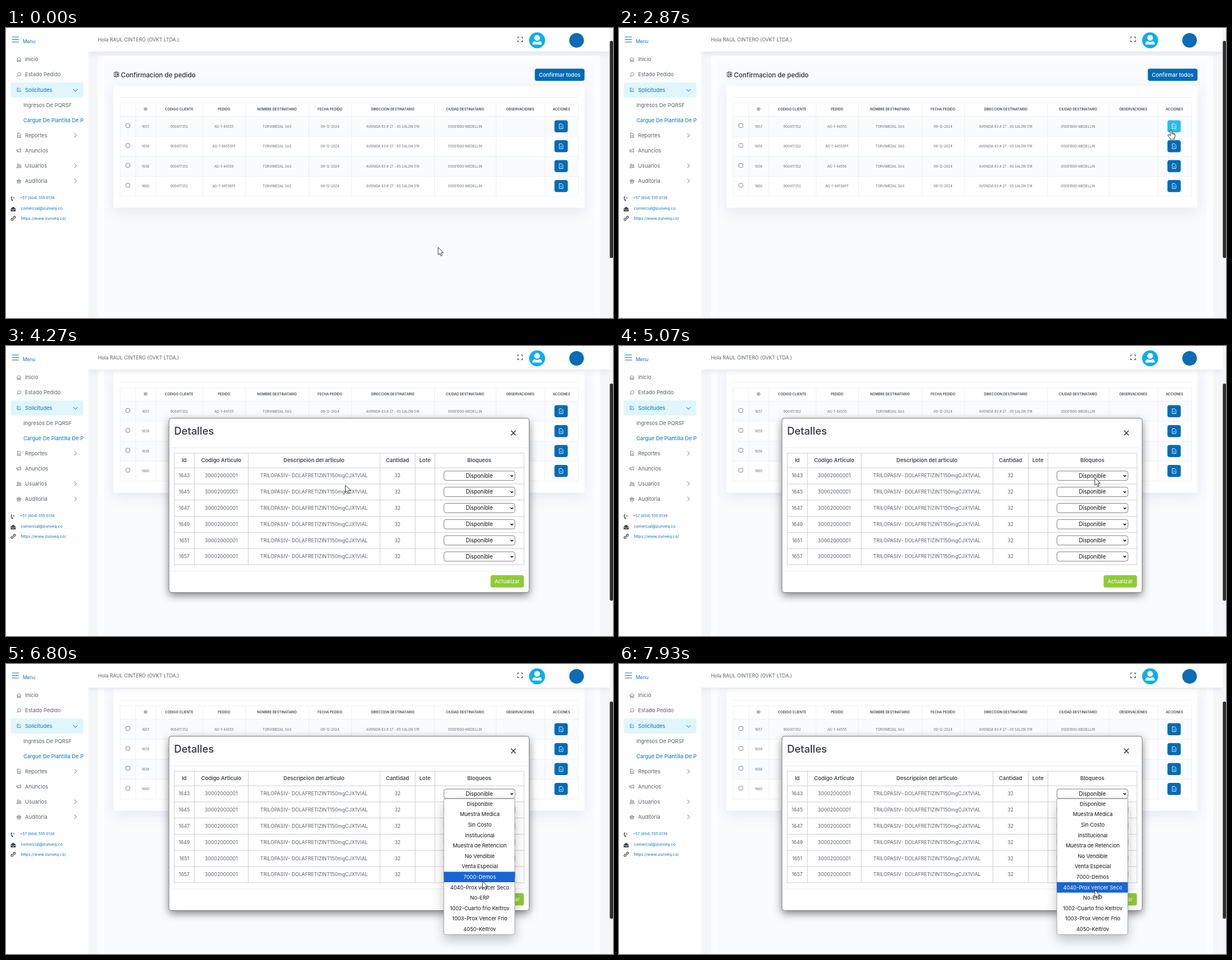
An HTML page with a canvas for the animation above (8 s loop, 1083x517 px).

```html
<!DOCTYPE html>
<html lang="es">
<head>
<meta charset="utf-8">
<title>Confirmacion de pedido</title>
<style>
  html, body { margin: 0; width: 100%; height: 100%; overflow: hidden; background: #fff; }
  canvas { display: block; width: 1083px; height: 517px; }
</style>
</head>
<body>
<canvas id="stage"></canvas>
<script>
const W = 1083, H = 517, LOOP = 8000, FPS = 15;
const SCROLL_AT = 3130, REFRESH_AT = 3990, OPEN_AT = 5390, SCROLL_BY = 59;
const BLUE = '#006bb6', LINK = '#0a70bd', GREY = '#5d6268', LINE = '#eceef1';

const canvas = document.getElementById('stage');
const ctx = canvas.getContext('2d');
const dpr = window.devicePixelRatio || 1;
canvas.width = W * dpr;
canvas.height = H * dpr;

// time, x, y of the pointer tip
const path = [
  [0, 771, 391], [530, 771, 391], [700, 759, 370], [1000, 840, 205], [1190, 895, 140],
  [1330, 928, 165], [1600, 984, 189], [1870, 986, 176], [2200, 984, 181], [2450, 998, 176],
  [2750, 983, 183], [3070, 990, 178], [3530, 990, 178], [3930, 885, 205], [4270, 605, 248],
  [4400, 598, 252], [4800, 825, 236], [5070, 849, 235], [5600, 849, 235], [5930, 853, 267],
  [6400, 846, 312], [6800, 850, 387], [7270, 904, 451], [7530, 880, 475], [7930, 849, 403],
  [8000, 849, 403]
];

const options = ['Disponible', 'Muestra Medica', 'Sin Costo', 'Institucional',
  'Muestra de Retencion', 'No Vendible', 'Venta Especial', '7000-Demos',
  '4040-Prox vencer Seco', 'No-ERP', '1002-Cuarto frio Keltrov',
  '1003-Prox Vencer Frio', '4050-Keltrov'];

const orders = [['1657', 'AG-1-44555'], ['1659', 'AG-1-44555FF'],
  ['1658', 'AG-1-44556'], ['1660', 'AG-1-44556FF']];
const orderCols = [203, 231, 267, 351, 427, 540, 616, 764, 874, 961, 1021];
const orderHeads = ['', 'ID', 'CODIGO CLIENTE', 'PEDIDO', 'NOMBRE DESTINATARIO', 'FECHA PEDIDO',
  'DIRECCION DESTINATARIO', 'CIUDAD DESTINATARIO', 'OBSERVACIONES', 'ACCIONES'];

const details = [
  { cols: [300, 337, 434, 664, 728, 764, 924], first: 1644, last: 1658, qty: '300', select: 780,
    name: 'ELIVORAN 75 - TRELOFAVINA 75mg X 30 CAP' },
  { cols: [300, 336, 432, 667, 730, 765, 924], first: 1643, last: 1657, qty: '32', select: 781,
    name: 'TRILOPASIV- DOLAFRETIZINT150mgCJX1VIAL' }
];
const detailHeads = ['Id', 'Codigo Articulo', 'Descripcion del articulo', 'Cantidad', 'Lote', 'Bloqueos'];

// y is the middle of the capitals
function text(str, x, y, size, color, align = 'left', weight = 400) {
  ctx.font = `${weight} ${size}px Inter, "Open Sans", sans-serif`;
  ctx.textAlign = align;
  ctx.fillStyle = color;
  ctx.fillText(str, x, y + size * 0.36);
}

function rect(x, y, w, h, color) {
  ctx.fillStyle = color;
  ctx.fillRect(x, y, w, h);
}

function box(x, y, w, h, r, fill, stroke, lw = 1) {
  ctx.beginPath();
  ctx.roundRect(x, y, w, h, r);
  if (fill) { ctx.fillStyle = fill; ctx.fill(); }
  if (stroke) { ctx.strokeStyle = stroke; ctx.lineWidth = lw; ctx.stroke(); }
}

function shadowed(color, blur, dy, draw) {
  ctx.save();
  ctx.shadowColor = color;
  ctx.shadowBlur = blur * dpr;
  ctx.shadowOffsetY = dy * dpr;
  draw();
  ctx.restore();
}

function shape(d, x, y, { stroke, fill, lw = 1 }) {
  const p = new Path2D(d);
  ctx.save();
  ctx.translate(x, y);
  if (fill) { ctx.fillStyle = fill; ctx.fill(p); }
  if (stroke) { ctx.strokeStyle = stroke; ctx.lineWidth = lw; ctx.stroke(p); }
  ctx.restore();
}

function disc(x, y, r, color) {
  ctx.beginPath();
  ctx.arc(x, y, r, 0, Math.PI * 2);
  ctx.fillStyle = color;
  ctx.fill();
}

// smooth curve through the keys without overshoot
function tangent(i, c) {
  const a = path[i - 1], b = path[i], d = path[i + 1];
  if (!a || !d) return 0;
  const s0 = (b[c] - a[c]) / (b[0] - a[0]), s1 = (d[c] - b[c]) / (d[0] - b[0]);
  return s0 * s1 <= 0 ? 0 : 2 * s0 * s1 / (s0 + s1);
}

function pointer(t) {
  let i = 0;
  while (i < path.length - 2 && path[i + 1][0] <= t) i++;
  const a = path[i], b = path[i + 1], dt = b[0] - a[0], u = (t - a[0]) / dt;
  return [1, 2].map(c => {
    const u2 = u * u, u3 = u2 * u;
    return (2 * u3 - 3 * u2 + 1) * a[c] + (u3 - 2 * u2 + u) * dt * tangent(i, c) +
      (3 * u2 - 2 * u3) * b[c] + (u3 - u2) * dt * tangent(i + 1, c);
  });
}

const icons = {
  home: 'M0 4L4 .5L8 4M1.2 3.3V8H3V5H5V8H6.8V3.3',
  search: 'M7.6 3.5a3 3 0 1 1-6 0a3 3 0 1 1 6 0M2.5 5.6L.3 7.8',
  edit: 'M4 1H1V7H7V4M3 5L7.2 .8M3 5L3.4 3.6',
  doc: 'M1.5 0H5L7 2V8H1.5ZM3 4H5.6M3 6H5.6',
  horn: 'M0 2.8H2.5L7.2 1V7L2.5 5.2H0ZM2 5.2V8',
  users: 'M4.3 2.5a1.6 1.6 0 1 1-3.2 0a1.6 1.6 0 1 1 3.2 0M0 7.5Q0 5 2.7 5T5.2 7.5ZM7.6 3.5a1.2 1.2 0 1 1-2.4 0a1.2 1.2 0 1 1 2.4 0M6 5.7Q8.3 5.5 8.3 7.5H6.5',
  audit: 'M0 4L4 .7L8 4ZM1.2 4V7.8H6.8V4M4 2.2V6.4M2.8 5.5H5.2'
};

const menu = [
  ['Inicio', 56, 'home'], ['Estado Pedido', 83, 'search'], ['Solicitudes', 110.3, 'edit', 'down'],
  ['Ingresos De PQRSF', 137.3], ['Cargue De Plantilla De P', 164.3],
  ['Reportes', 191.4, 'doc', 'right'], ['Anuncios', 218.4, 'horn'],
  ['Usuarios', 245.5, 'users', 'right'], ['Auditoria', 272.5, 'audit', 'right']
];

function sidebar() {
  rect(0, 0, 147, H, '#fff');
  shape('M0 0H12.5M0 4.5H12.5M0 9H12.5', 10.5, 16, { stroke: LINK, lw: 1.2 });
  text('Menu', 30, 24.3, 8.4, LINK);
  box(8.5, 97, 129.5, 27, 4, '#e0f6fa');
  ctx.save();
  ctx.beginPath();
  ctx.rect(0, 0, 138.5, H);
  ctx.clip();
  menu.forEach(([label, y, icon, arrow], i) => {
    const color = i === 2 || i === 4 ? LINK : GREY;
    text(label, icon ? 34 : 31, y, 9.4, color);
    if (icon) shape(icons[icon], 19, y - 4, { stroke: color, lw: 0.8 });
    if (arrow === 'down') shape('M-4 -1.8L0 2.2L4 -1.8', 124, y + 0.5, { stroke: color });
    if (arrow === 'right') shape('M-1.8 -3.6L1.8 0L-1.8 3.6', 124, y, { stroke: GREY });
  });
  ctx.restore();
  text('+57 (604) 555 0138', 25, 302.4, 6.6, LINK);
  text('comercial@zunveq.co', 26.5, 321.3, 7.1, LINK);
  text('https://www.zunveq.co/', 26.5, 339.8, 7.1, LINK);
  const dark = '#454a50';
  shape('M2.6 .3L.6 1Q-.6 5.5 3 8.6L4.6 7.4L3.4 5.6L2.4 6Q1.4 4.4 1.6 2.8L2.9 2.2Z', 8.3, 300, { fill: dark });
  shape('M4.6 1.3Q6.6 1.5 6.4 4M4.6 3Q5.2 3 5.2 4', 8.3, 300, { stroke: dark, lw: 0.8 });
  shape('M0 3.2L4.5 0L9 3.2V8.6H0Z', 8.3, 318.5, { fill: dark });
  shape('M0 4L4.5 6.6L9 4', 8.3, 318.5, { stroke: '#fff', lw: 0.7 });
  shape('M3 5.6L5.6 3M4 2.6L5.6 1Q7 0 8 1.1T7.9 3.3L6.2 5M5 6L3.3 7.7Q2 8.7.9 7.6T1 5.3L2.6 3.7', 8.5, 335, { stroke: dark, lw: 1.3 });
}

function header() {
  shadowed('rgba(70,80,100,.13)', 10, 2, () => rect(147, -20, 930, 62, '#fff'));
  text('Hola RAUL CINTERO (OVKT LTDA.)', 164, 21, 8.75, GREY);
  shape('M0 2.6V0H2.6M5.8 0H8.4V2.6M8.4 5.8V8.4H5.8M2.6 8.4H0V5.8', 913, 16, { stroke: '#444', lw: 1.1 });
  disc(947.6, 22, 14.3, '#0daeea');
  disc(947.6, 17.6, 5.1, '#fff');
  shape('M-8.4 7.4Q-8.4 2.2 -4.4 1.6Q0 4.4 4.4 1.6Q8.4 2.2 8.4 7.4Z', 947.6, 22, { fill: '#fff' });
  disc(1018, 22, 13, '#0a6cb5');
}

function actionButton(y, hot) {
  box(978.5, y - 10.8, 23.8, 21.6, 4, hot ? '#2bb9f1' : BLUE);
  shape('M0 0H4.4L6.6 2.2V8.6H0ZM2.4 4.3H3.4V6.8', 987.1, y - 4.3, { stroke: '#fff', lw: 0.9 });
}

function page(scrolled, hot) {
  rect(147, 0, 930, H, '#f4f6f8');
  ctx.save();
  ctx.translate(0, scrolled ? -SCROLL_BY : 0);
  rect(164, 49, 896, 600, '#fdfdfe');
  rect(175, 58, 874, 600, '#fafbfd');

  shape('M2.5 1H0V8.5H2.5M5 1H8V8.5H5M2.5 0V9.6L5 9.2V.4ZM5.6 3L7.4 6.4M7.4 3L5.6 6.4', 193, 78, { stroke: '#333', lw: 0.9 });
  text('Confirmacion de pedido', 205, 84, 11.6, '#2c2f33', 'left', 500);
  box(943.5, 72.5, 88.7, 21.7, 4, BLUE);
  text('Confirmar todos', 987.8, 83.3, 9.5, '#fff', 'center', 500);

  shadowed('rgba(70,85,110,.11)', 24, 7, () => box(191.6, 103.6, 840.8, 217, 4, '#fff'));
  rect(203, 123, 818, 1, LINE);
  for (const y of [157, 228.5]) rect(203, y, 818, 35.5, '#fafbfc');
  for (const y of [133.5, 157, 192.7, 228.3, 264, 299.5]) rect(203, y, 818, 0.9, LINE);
  for (const x of orderCols) rect(x, 133.5, 0.9, 166, LINE);

  const mid = i => (orderCols[i] + orderCols[i + 1]) / 2;
  orderHeads.forEach((h, i) => text(h, mid(i), 145.1, 5.95, '#43484e', 'center', 600));
  orders.forEach(([id, code], r) => {
    const y = 175.3 + r * 35.5;
    box(213.9, y - 4.9, 7, 7, 1.6, '#fff', '#777', 0.9);
    const cells = [id, '900417352', code, 'TORVIMEDAL SAS', '09-12-2024',
      'AVENIDA 83 # 27 - 65 SALON 519', '05001000-MEDELLIN'];
    cells.forEach((c, i) => text(c, mid(i + 1), y + 0.2, 5.95, '#666b72', 'center'));
    actionButton(y, hot && r === 0);
  });
  ctx.restore();
}

function scrollbar(scrolled) {
  rect(1077, 0, 6, H, '#f3f4f5');
  box(1077.3, scrolled ? 67 : 23, 5.7, 387, 2.5, '#2d2d2d');
}

function select(x, y) {
  box(x + 0.3, y - 8.3, 126.8, 16.8, 4, '#fff', '#707070', 0.9);
  text('Disponible', x + 63.5, y, 9.7, '#111', 'center');
  shape('M-2.2 -1.2L0 1.2L2.2 -1.2', x + 121.5, y + 0.3, { stroke: '#111', lw: 1.5 });
}

function modal(d) {
  shadowed('rgba(0,0,0,.5)', 15, 5, () => box(290.8, 128.9, 642.6, 310.6, 4, '#fff'));
  box(290.8, 128.9, 642.6, 310.6, 4, '#fff', '#7c7c7c');
  text('Detalles', 300, 151.4, 18.4, '#33373c', 'left', 500);
  shape('M-4.2 -4.2L4.2 4.2M4.2 -4.2L-4.2 4.2', 905.3, 155, { stroke: '#333', lw: 1.4 });
  rect(291.4, 181, 641.4, 1, '#ececec');
  rect(291.4, 400.5, 641.4, 1, '#ececec');

  const rule = '#cdcdcd', step = 28.8;
  rect(300, 190.6, 624, 1, rule);
  for (let r = 0; r < 7; r++) rect(300, 216.6 + r * step, 624, 1, rule);
  for (const x of d.cols) rect(x - 0.3, 190.6, 1, 199.8, rule);

  const mid = i => (d.cols[i] + d.cols[i + 1]) / 2;
  detailHeads.forEach((h, i) => text(h, mid(i), 203.8, 9.5, '#454a50', 'center', 600));
  for (let r = 0; r < 6; r++) {
    const y = 231.2 + r * step, id = r < 5 ? d.first + 2 * r : d.last;
    [id, '30002000001', d.name, d.qty].forEach((c, i) => text(String(c), mid(i), y, 8.75, GREY, 'center'));
    select(d.select, y);
  }
  box(864.6, 408.6, 59.4, 21.8, 3.5, '#8fcb38');
  text('Actualizar', 894.2, 419.3, 9.5, '#fff', 'center');
}

function dropdown(y) {
  const top = 240.2, step = 18.6, h = 242.3;
  const active = Math.max(0, Math.min(options.length - 1, Math.floor((y - top) / step)));
  shadowed('rgba(0,0,0,.24)', 20, 9, () => box(781, top, 127, h, [0, 0, 4, 4], '#fff'));
  box(781.2, top, 126.6, h, [0, 0, 4, 4], '#fff', '#9b9b9b', 0.9);
  options.forEach((o, i) => {
    const on = i === active;
    if (on) rect(781.2, top + i * step, 126.6, step, '#1866d3');
    text(o, 845.2, top + (i + 0.5) * step, 9.3, on ? '#fff' : '#151515', 'center');
  });
}

function cursor(x, y, hand) {
  const arrow = 'M0 0V13.4L3.1 10.6L5.2 15.5L7.4 14.6L5.3 9.8H9.6Z';
  const finger = 'M-1.6 1.4Q-.2 -.5 1.1 1.4V5.8Q3 4.9 3.7 6.3Q5.2 5.6 5.6 7Q6.9 6.8 7 8.6V11.6Q6.8 13.6 5.6 15V16.8H-1.6V15.2L-5.6 10.2Q-6 8.2 -4 8.6L-1.6 10.6ZM1.1 5.8V8.6M3.7 6.3V8.8M5.6 7V9';
  shape(hand ? finger : arrow, x, y, { fill: '#fff', stroke: '#222', lw: 0.9 });
}

function frame() {
  const t = (performance.now() - start) % LOOP;
  const tick = Math.floor(t * FPS / 1000 + 0.06) * 1000 / FPS;
  const [x, y] = pointer(tick);
  const scrolled = tick >= SCROLL_AT;
  const hot = !scrolled && x > 979 && x < 1002 && y > 165 && y < 186;

  ctx.setTransform(dpr, 0, 0, dpr, 0, 0);
  page(scrolled, hot);
  header();
  sidebar();
  scrollbar(scrolled);
  if (scrolled) modal(details[tick >= REFRESH_AT ? 1 : 0]);
  if (tick >= OPEN_AT) dropdown(y);
  cursor(x, y, hot);
  requestAnimationFrame(frame);
}

const start = performance.now();
frame();
</script>
</body>
</html>
```
